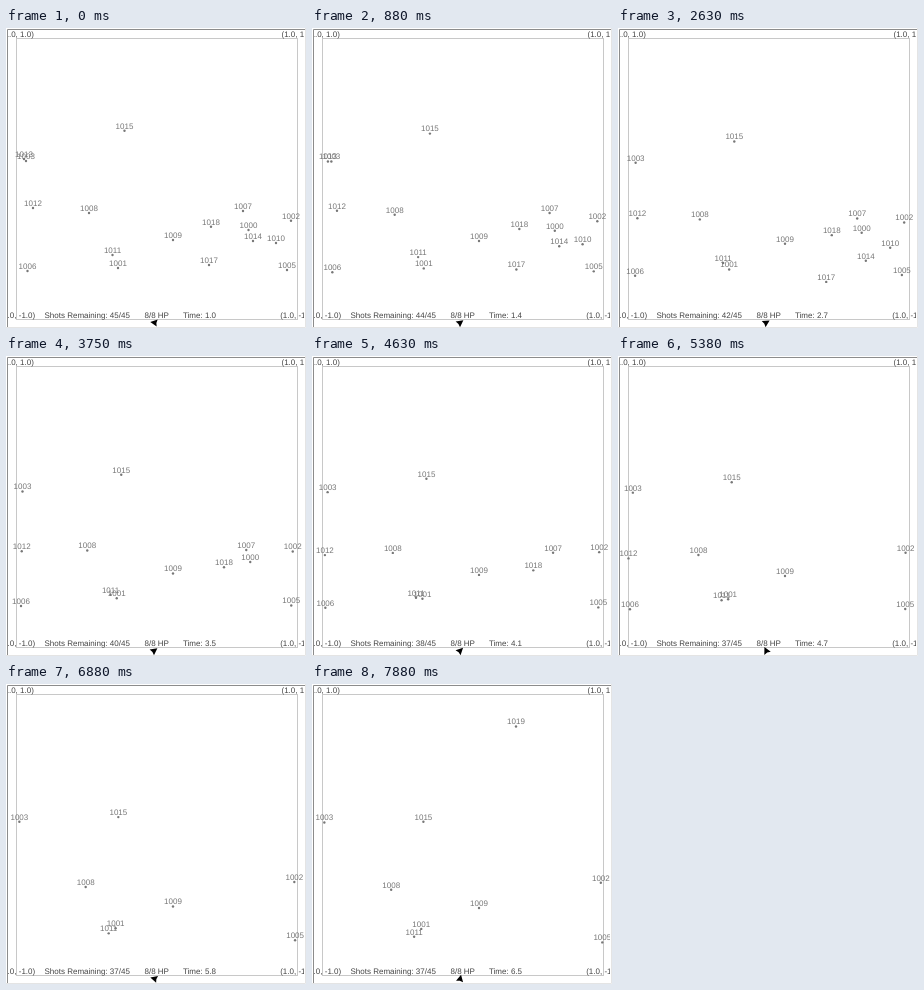
Recreate the animation shown at these times as an HTML page. Size 300 px wide and 300 px high, loop 8000 ms.

```html
<!DOCTYPE html>
<html lang="en">
<head>
<meta charset="utf-8">
<title>Turret simulation</title>
<style>
  html, body { margin: 0; width: 100%; height: 100%; overflow: hidden; background: #fff; }
  svg { display: block; width: 100vw; height: 100vh; }
  text { font: 8px "Liberation Sans", Arial, sans-serif; fill: #444; text-rendering: geometricPrecision; }
  .mid, .target text { text-anchor: middle; }
  .target text, .target circle { fill: #777; }
  .field { fill: none; stroke: #c8c8c8; }
</style>
</head>
<body>
<svg viewBox="0 0 300 300">
  <clipPath id="canvas"><rect x="2" y="2" width="296" height="296"/></clipPath>
  <rect width="300" height="300" fill="#fff"/>
  <path d="M1.5 299V1.5H299" fill="none" stroke="#8c8c8c"/>
  <path d="M299.5 0V299.5H0" fill="none" stroke="#e4e4e4"/>
  <g clip-path="url(#canvas)">
    <rect class="field" x="10.5" y="10.5" width="281" height="281"/>
    <g id="targets"></g>
    <text class="mid" x="10.5" y="9">(-1.0, 1.0)</text>
    <text class="mid" x="291.5" y="9">(1.0, 1.0)</text>
    <text class="mid" x="10.5" y="290">(-1.0, -1.0)</text>
    <text class="mid" x="291.5" y="290">(1.0, -1.0)</text>
    <text id="shots" x="38.5" y="290"></text>
    <text x="138.5" y="290">8/8 HP</text>
    <text id="clock" x="177" y="290"></text>
  </g>
  <path id="turret" d="M4 0L-3 -3.6L-2.2 0L-3 3.6Z"/>
</svg>
<script>
const LOOP = 8000, STEP = 125;
const GUN = { x: 148.2, y: 294.6 };
const LEFT_EDGE = 10.3, AMMO = 45;
const REST_ANGLE = 172, TURN_STEPS = 5, FIRE_GAP = 3, BEAM_DEGREES = 2.5;

// Each target drifts in a straight line: id, start point, velocity
const targets = new Map([
  [1000, 242.5, 202, 0.7, 1.6],
  [1001, 112, 240, -0.5, 0.9],
  [1002, 285, 192.7, 0.7, 1.1],
  [1003, 20, 133, -1.4, 1],
  [1005, 281, 242, 1.7, 3],
  [1006, 21.5, 243, -2.6, 2.8],
  [1007, 237, 183, 1.3, 4.4],
  [1008, 83, 185, -0.7, 3.8],
  [1009, 167, 212, 0, 2.2],
  [1010, 270, 215, 1.3, 2.8],
  [1011, 106.5, 227, -0.8, 4.7],
  [1012, 27, 180, -4.5, 6.1],
  [1013, 18, 131, -4.6, 5.5],
  [1014, 247, 213, 0.5, 11.7],
  [1015, 118.5, 102.7, -1.3, 6.4],
  [1017, 203, 237, 3.1, 10],
  [1018, 205, 198.7, 5.2, 5],
  [1019, 204, 42.5, 0, 0, 57]
].map(([id, x, y, vx, vy, born = 0]) => [id, { x, y, vx, vy, born, gone: Infinity }]));

// The turret follows one prey at a time; its last shots land at `until`
const hunts = [
  { prey: 1014, until: 12, shots: 3 },
  { prey: 1014, until: 27, shots: 2, hit: true },
  { prey: 1000, until: 35, shots: 2, hit: true },
  { prey: 1018, until: 40, shots: 1, hit: true },
  { prey: 1006, until: 57, shots: 0 },
  { prey: 1019, until: LOOP / STEP, shots: 0 }
];

// Steady clock after a slow start
const clockAt = step => 0.8 + 0.09 * step + 0.2 * Math.exp(-step / 3);

function place(target, step) {
  const t = clockAt(step) - 1;
  return { x: target.x + target.vx * t, y: target.y + target.vy * t };
}

function bearing(target, step) {
  const p = place(target, step);
  return Math.atan2(GUN.y - p.y, p.x - GUN.x) * 180 / Math.PI;
}

// A hit removes everything in line with the prey
for (const { prey, until } of hunts.filter(h => h.hit)) {
  const aim = bearing(targets.get(prey), until);
  for (const target of targets.values()) {
    const inBeam = Math.abs(bearing(target, until) - aim) < BEAM_DEGREES;
    if (inBeam && target.born < until) target.gone = Math.min(target.gone, until);
  }
}

function aimAt(step) {
  const i = hunts.findIndex(h => step < h.until);
  const last = hunts[i - 1];
  const since = last ? last.until : 0;
  const from = last ? bearing(targets.get(last.prey), since) : REST_ANGLE;
  const to = bearing(targets.get(hunts[i].prey), step);
  return from + (to - from) * Math.min(1, (step - since) / TURN_STEPS);
}

function shotsFired(step) {
  let count = 0;
  for (const { until, shots } of hunts)
    for (let i = 0; i < shots; i++) if (until - i * FIRE_GAP <= step) count++;
  return count;
}

const byId = id => document.getElementById(id);

function make(tag, parent, attrs) {
  const el = document.createElementNS("http://www.w3.org/2000/svg", tag);
  for (const key in attrs) el.setAttribute(key, attrs[key]);
  return parent.appendChild(el);
}

for (const [id, target] of targets) {
  target.mark = make("g", byId("targets"), { class: "target" });
  make("circle", target.mark, { r: 1.2 });
  make("text", target.mark, { y: -2.1 }).textContent = id;
}

function draw(step) {
  for (const target of targets.values()) {
    const { x, y } = place(target, step);
    const shown = step >= target.born && step < target.gone && x > LEFT_EDGE;
    target.mark.setAttribute("display", shown ? "inline" : "none");
    target.mark.setAttribute("transform", `translate(${x} ${y})`);
  }
  byId("shots").textContent = `Shots Remaining: ${AMMO - shotsFired(step)}/${AMMO}`;
  byId("clock").textContent = `Time: ${clockAt(step).toFixed(1)}`;
  byId("turret").setAttribute("transform", `translate(${GUN.x} ${GUN.y}) rotate(${-aimAt(step)})`);
}

function tick() {
  draw(Math.floor(performance.now() % LOOP / STEP));
  requestAnimationFrame(tick);
}
tick();
</script>
</body>
</html>
```
